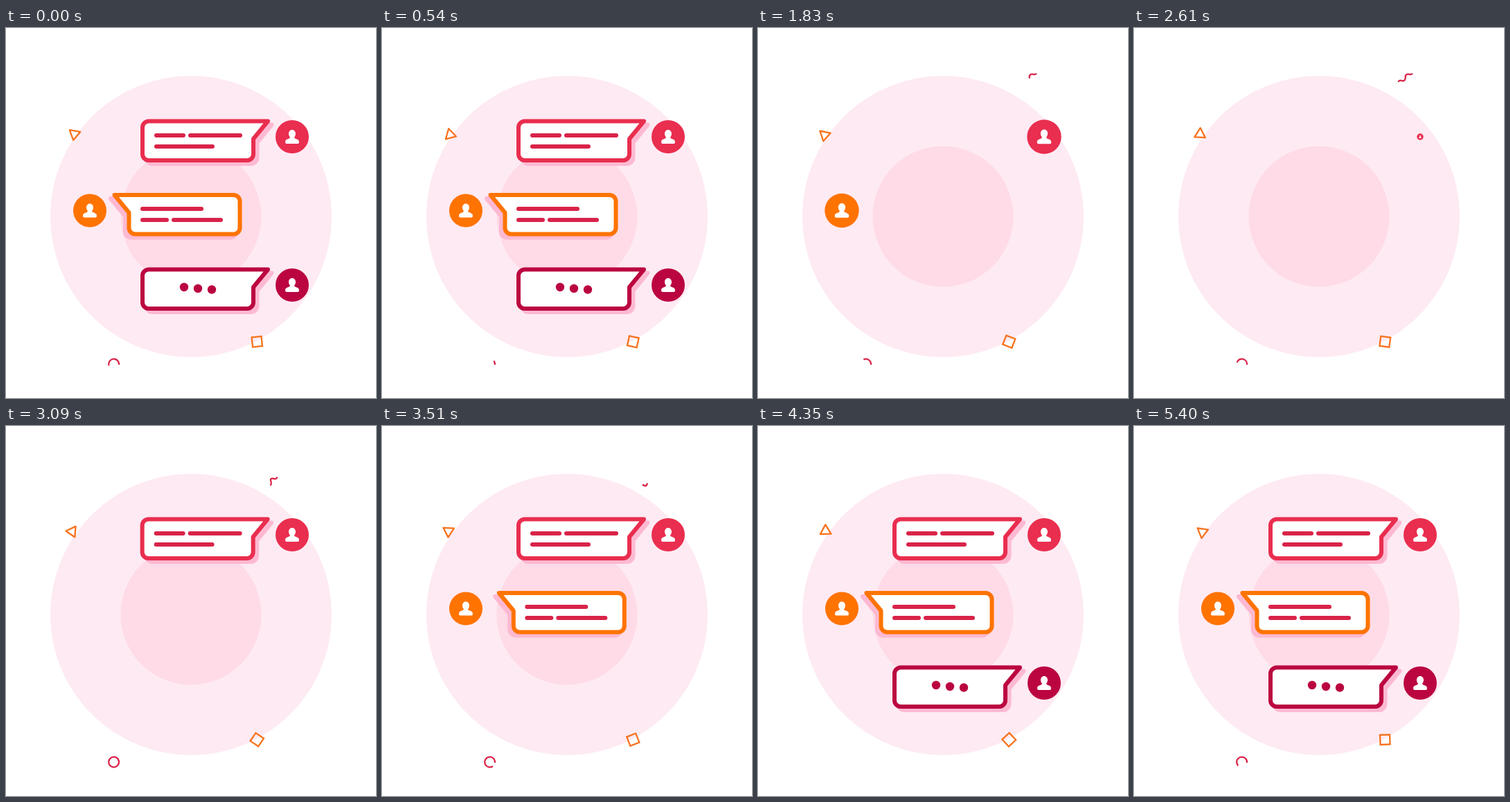
An HTML page with a canvas that plays this animation: 534x534 px, repeating every 5.43 s.

```html
<!DOCTYPE html>
<html>
<head>
<meta charset="utf-8">
<style>
html, body { margin: 0; width: 100%; height: 100%; overflow: hidden; background: #fff; }
canvas { display: block; }
</style>
</head>
<body>
<canvas id="stage" width="534" height="534"></canvas>
<script>
const c = document.getElementById('stage').getContext('2d');
const LOOP = 5430, TURN = Math.PI * 2, RAD = Math.PI / 180;
const RED = '#e92e4f', ORANGE = '#ff7300', WINE = '#bb0540', SHADE = '#fdb9d2';

const bubble = new Path2D('M206 134.5H378L357 160V182a9 9 0 0 1-9 9H206a9 9 0 0 1-9-9V143.5a9 9 0 0 1 9-9Z');
const person = new Path2D('M-5-4.5C-5-12 5-12 5-4.5C5-2 4-1 3 1C4 4 10 2.5 10 7.5Q10 10 8 10H-8Q-10 10-10 7.5C-10 2.5-4 4-3 1C-4-1-5-2-5-4.5Z');
const squiggle = new Path2D('M402 65.5C400 69 397 65.5 393.5 67C390 69 393 72 391 74.5C389 79 386 74.5 383 76C379.5 78 384.5 81 382.5 84C381 88 378 86 376 84.5');
const SQUIGGLE_LENGTH = 43;

const clamp = x => Math.max(0, Math.min(1, x));
const span = (t, start, length) => clamp((t - start) / length);
const backIn = p => p * p * (2.70158 * p - 1.70158);
const backOut = p => 1 - backIn(1 - p);
const smooth = p => (1 - Math.cos(Math.PI * p)) / 2;

// Value at time t from [time, value] keys
function track(t, keys, ease = p => p) {
  const i = keys.findIndex(k => k[0] > t);
  if (i < 0) return keys[keys.length - 1][1];
  if (!i) return keys[0][1];
  const [t0, a] = keys[i - 1], [t1, b] = keys[i];
  return a + (b - a) * ease((t - t0) / (t1 - t0));
}

function at(x, y, draw) {
  c.save();
  c.translate(x, y);
  draw();
  c.restore();
}

function disc(x, y, r, color) {
  c.fillStyle = color;
  c.beginPath();
  c.arc(x, y, r, 0, TURN);
  c.fill();
}

function dash(x1, x2, y) {
  c.beginPath();
  c.moveTo(x1, y);
  c.lineTo(x2, y);
  c.stroke();
}

const rows = [
  { y: 0, color: RED, out: 1450, lines: [[217, 256, 155], [266, 338, 155], [217, 298, 171]] },
  { y: 106.5, color: ORANGE, out: 1450, flip: true, lines: [[197, 282, 261], [197, 232, 277], [242, 310, 277]] },
  { y: 214, color: WINE, out: 1300, dots: [[257, 374], [277, 376], [297, 377.5]], lines: [] }
];

function drawBubble(row, i, t) {
  const start = 2803 + 510 * i;
  let shift, alpha;
  if (t < 2400) {
    const p = span(t, row.out, 300);
    shift = backIn(p);
    alpha = 1 - span(p, 0.3, 0.55);
  } else {
    const p = span(t, start, 300);
    shift = 1 - backOut(p);
    alpha = clamp(p * 5);
  }
  if (!alpha) return;
  c.globalAlpha = alpha;
  c.lineWidth = 6;
  c.lineCap = c.lineJoin = 'round';
  at(shift * (row.flip ? -136 : 136), 0, () => {
    at(row.flip ? 534.5 : 0, row.y, () => {
      if (row.flip) c.scale(-1, 1);
      c.fillStyle = c.strokeStyle = SHADE;
      at(5.5, 5, () => { c.fill(bubble); c.stroke(bubble); });
      c.fillStyle = '#fff';
      c.strokeStyle = row.color;
      c.fill(bubble);
      c.stroke(bubble);
    });
    row.lines.forEach(l => dash(...l));
    if (row.dots) row.dots.forEach(([x, y]) => disc(x, y, 6.2, row.color));
  });
  c.globalAlpha = 1;
}

function drawAvatar(row, i, t) {
  let size;
  if (t >= 2400) size = backOut(span(t, 2595 + 510 * i, 360));
  else if (row.dots) size = 1 - span(t, 1300, 300) ** 2;
  else size = 1 - backIn(span(t, 1770, 400));
  if (size <= 0) return;
  at(row.flip ? 121 : 413, 157 + row.y, () => {
    c.scale(size, size);
    disc(0, 0, 24, row.color);
    c.fillStyle = '#fff';
    c.fill(person);
  });
}

function drawTrinkets(t) {
  const turn = t / LOOP * TURN;
  c.lineCap = c.lineJoin = 'round';
  c.lineWidth = 2.3;
  c.strokeStyle = '#f8721c';

  at(97, 153, () => {
    c.rotate(turn);
    c.translate(1.7, 0);
    c.beginPath();
    for (let k = 0; k < 3; k++) {
      const a = (100 + 120 * k) * RAD;
      c.lineTo(9 * Math.cos(a), 9 * Math.sin(a));
    }
    c.closePath();
    c.stroke();
  });

  c.lineJoin = 'miter';
  at(362.3, 452.7, () => {
    c.rotate(-6 * RAD - 2 * turn);
    c.strokeRect(-7, -7, 14, 14);
  });

  c.lineCap = 'butt';
  c.strokeStyle = '#d92349';
  const arc = track(t, [[-280, 360], [340, 0], [1200, 360], [2250, 0], [3000, 360],
    [3260, 360], [4340, 0], [5150, 360], [5770, 0]], smooth);
  if (arc > 0.5) {
    c.beginPath();
    c.arc(155.6, 485, 7.4, (8 - arc) * RAD, 8 * RAD);
    c.stroke();
  }

  const head = track(t, [[550, 0], [1080, 0.1], [1830, 0.36], [3090, 0.86], [3510, 1]]);
  const tail = track(t, [[2700, 0], [3090, 0.38], [3510, 0.78], [4150, 1]]);
  if (head > tail) {
    c.setLineDash([(head - tail) * SQUIGGLE_LENGTH, 200]);
    c.lineDashOffset = -tail * SQUIGGLE_LENGTH;
    c.stroke(squiggle);
    c.setLineDash([]);
  }
}

function frame() {
  const t = performance.now() % LOOP;
  c.fillStyle = '#fff';
  c.fillRect(0, 0, 534, 534);
  disc(267, 272, 203, '#feeaf3');
  disc(267, 272, 101.5, '#fedbe6');
  rows.forEach((row, i) => {
    drawBubble(row, i, t);
    drawAvatar(row, i, t);
  });
  drawTrinkets(t);
  requestAnimationFrame(frame);
}
frame();
</script>
</body>
</html>
```
